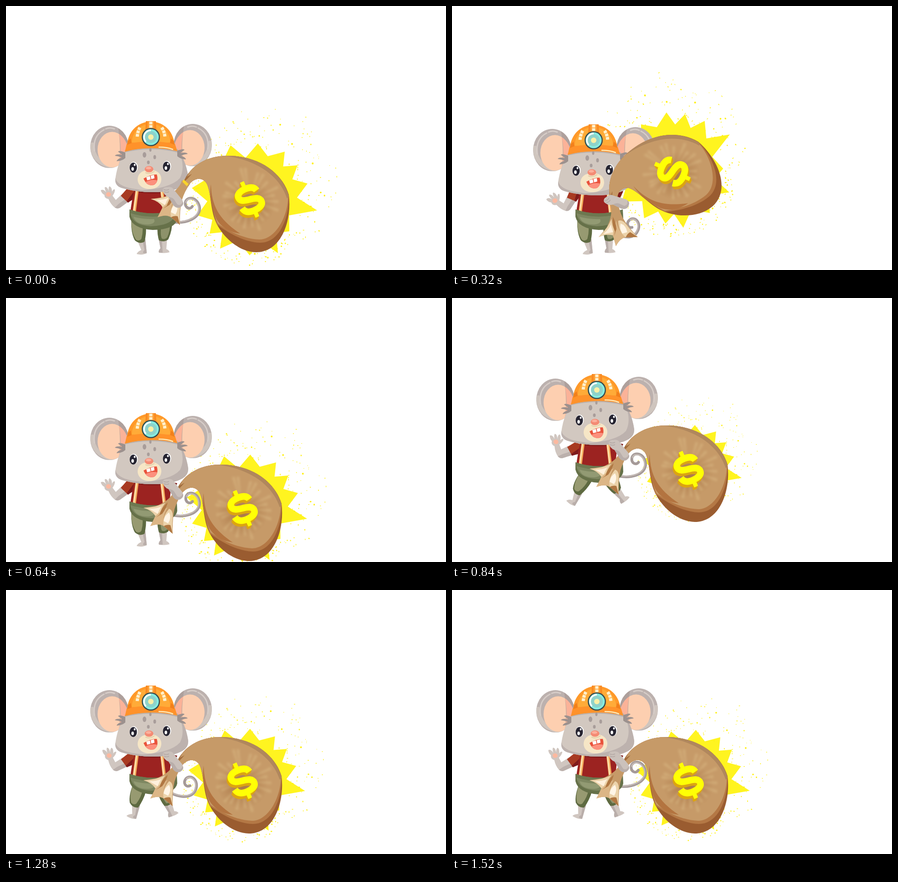
An HTML page that plays this animation: 966x580 px, repeating every 1.56 s.

```html
<!DOCTYPE html>
<html lang="en">
<head>
<meta charset="utf-8">
<title>Mouse miner with a money bag</title>
<style>
  html, body { margin: 0; width: 100%; height: 100%; overflow: hidden; background: #fff; }
  svg { display: block; width: 966px; height: 580px; }
</style>
</head>
<body>
<svg viewBox="0 0 966 580" xmlns="http://www.w3.org/2000/svg">
  <defs>
    <clipPath id="earClip"><ellipse cx="227" cy="309.500" rx="42" ry="46.500"/></clipPath>
    <clipPath id="headClip"><use href="#skull"/></clipPath>
    <radialGradient id="shade">
      <stop offset="0" stop-color="#a06a3a" stop-opacity=".75"/>
      <stop offset="1" stop-color="#a06a3a" stop-opacity="0"/>
    </radialGradient>
    <filter id="soft" x="-20%" y="-20%" width="140%" height="140%"><feGaussianBlur stdDeviation="2.500"/></filter>
    <path id="skull" d="M263 317C250 335 243 358 240 380Q239 394 252 399C280 408 310 409 330 409C356 408 375 404 388 396Q401 388 400 374C396 348 388 330 376 314Q320 300 263 317Z"/>
    <g id="ear">
      <ellipse cx="227" cy="309.500" rx="42" ry="46.500" fill="#bcb1ae"/>
      <g clip-path="url(#earClip)">
        <path d="M185 300Q182 350 238 358L238 350Q196 345 192 300Z" fill="#cfc5be"/>
        <path d="M194 318Q190 285 215 272M219 270Q228 266 238 270" fill="none" stroke="#d6ccc7" stroke-width="3" stroke-linecap="round"/>
        <ellipse cx="233" cy="315.500" rx="32" ry="39" fill="#fdcfb0"/>
        <path d="M245 260Q254 310 247 358H275V260Z" fill="#a2908c" opacity=".5"/>
        <path d="M248 281Q256 315 247 351Q268 345 268 310Q262 290 248 281Z" fill="#fbb298"/>
      </g>
    </g>
    <path id="tuft" d="M262 322Q248 316 246 320Q252 324 255 327Q242 324 239 329Q248 330 254 333Q244 336 243 341Q254 341 262 334Z" fill="#9c918e"/>
    <g id="eye">
      <ellipse cx="1" cy="-1" rx="9" ry="11.500" fill="#fff"/>
      <ellipse rx="8" ry="11" fill="#262431"/>
      <ellipse cx="3" cy="-6" rx="2" ry="2.500" fill="#fff"/>
      <ellipse cx="-1.500" cy="3" rx="2.800" ry="4" fill="#fff"/>
    </g>
    <g id="coin">
      <path d="M22-12C20-22 11-25 0-25C-13-25-21-21-21-13C-21-4-11-2 0 0C13 2 22 5 22 14C22 22 13 26 0 26C-13 26-21 22-23 11" fill="none" stroke-width="14.500"/>
      <path d="M0-42V-25M0 25V42" stroke-width="9"/>
    </g>
  </defs>

  <g id="mouseBack">
    <g class="bag"><g id="burst"></g></g>
    <g id="tail" fill="none" stroke-linecap="round">
      <path d="M350 474C385 492 423 484 424 459C424 436 402 430 396 443C392 454 402 462 409 455" stroke="#a59a98" stroke-width="6"/>
      <path d="M350 473C385 490 421 482 422 459C422 438 402 432 397 443" stroke="#c2b8b4" stroke-width="3"/>
    </g>

    <g id="legL">
      <path d="M287 512L297 536Q288 540 287 545Q300 548 309 543L306 512Z" fill="#d0c6c0"/>
      <path d="M299 512L304 536Q296 545 309 543L306 512Z" fill="#b9aeaa"/>
      <path d="M275 470Q274 500 283 515Q293 524 304 518Q309 500 307 478Z" fill="#5e6a41"/>
      <path d="M275 470Q275 500 286 514Q293 517 297 512Q302 495 299 480Z" fill="#979a71"/>
    </g>
    <g id="legR">
      <path d="M335 510L339 532Q334 538 336 542Q350 544 359 541Q358 536 352 534L354 508Z" fill="#d0c6c0"/>
      <path d="M335 510L339 532Q334 538 336 542L344 542L342 510Z" fill="#b9aeaa"/>
      <path d="M333 480Q331 502 336 515Q347 520 356 513Q365 495 365 472Z" fill="#5e6a41"/>
      <path d="M341 482Q338 502 342 511Q349 514 354 508Q361 492 360 475Z" fill="#8d926a"/>
    </g>

    <g id="armL">
      <path d="M256 412L241 426L234 417Q240 408 239 403Q235 402 233 408Q232 397 227 396Q224 400 226 407Q222 396 217 398Q216 402 220 409Q213 401 208 405Q210 412 216 415Q216 423 225 424Q230 436 239 443Q246 447 252 442L274 426Z" fill="#d0c6c0"/>
      <path d="M239 443Q246 447 252 442L274 426L268 420L247 435Z" fill="#bbb0ac"/>
      <ellipse cx="225" cy="414" rx="5.500" ry="5" fill="#fbb9a0"/>
      <path d="M265 402L252 417L268 432L284 414V402Z" fill="#a83a22"/>
      <path d="M282 406L265 429L268 432L286 420Z" fill="#7f1b1b"/>
    </g>

    <path d="M355 402L376 407L369 422L350 424Z" fill="#7f1b1b"/>
    <path d="M283 398H352L362 420L358 460H272Q276 425 283 398Z" fill="#9c2321"/>
    <path d="M283 402H352L353 410Q315 414 282 408Z" fill="#7f1b1b"/>
    <path d="M288 404L281 456M342 404L348 456" stroke="#f5ad5c" stroke-width="7"/>
    <path d="M287 404L280 456M341 404L347 456" stroke="#fde0ae" stroke-width="3"/>
    <path d="M271 447Q322 464 375 447L376 468Q372 491 322 492Q277 489 271 463Z" fill="#667149"/>
    <path d="M273 455Q322 470 371 455Q371 481 318 484Q278 482 273 455Z" fill="#7e8761"/>
    <path d="M280 463Q300 469 325 468Q330 478 312 480Q284 480 280 463Z" fill="#929a73"/>
    <path d="M271 447Q322 464 375 447V454Q322 471 271 454Z" fill="#6d7850"/>
  </g>

  <g id="head">
    <use href="#ear"/>
    <use href="#ear" transform="matrix(-1 0 0 1 637 -4)"/>
    <use href="#skull" fill="#d2c8c0"/>
    <g clip-path="url(#headClip)">
      <path d="M376 312Q396 350 382 378Q360 402 290 405V412H405V312Z" fill="#bdb2ae"/>
      <path d="M240 378Q245 398 290 403L330 411H240Z" fill="#bdb2ae"/>
      <path d="M255 323Q318 306 382 323V300H255Z" fill="#bab0ab"/>
    </g>
    <use href="#tuft"/>
    <use href="#tuft" transform="matrix(-1 0 0 1 638 -4)"/>
    <g fill="#a89d9a">
      <ellipse cx="304" cy="327" rx="4" ry="6"/><ellipse cx="317" cy="316" rx="2.500" ry="4"/>
      <ellipse cx="326.500" cy="332" rx="3" ry="4.500"/><ellipse cx="312.500" cy="343.500" rx="3" ry="4"/>
    </g>
    <use href="#eye" x="279.500" y="355"/>
    <use href="#eye" x="352.500" y="353"/>
    <path d="M289 382C289 366 302 360 316 360C332 360 341 369 341 381C340 395 330 402 315 402C300 402 290 394 289 382Z" fill="#f6e6c6"/>
    <path d="M306 366Q316 371 326 363" fill="none" stroke="#e3cfa8" stroke-width="2"/>
    <ellipse cx="314" cy="358.500" rx="9.500" ry="7" fill="#f48b74"/>
    <ellipse cx="313" cy="356" rx="6" ry="3" fill="#fcb09c"/>
    <path d="M302 379Q318 370 331 370Q336 386 325 393Q309 397 302 379Z" fill="#e9533c"/>
    <path d="M306 387Q318 380 332 383Q330 391 323 393.500Q312 395 306 387Z" fill="#fc907d"/>
    <path d="M308 376L316 373.500L317.500 381L310 383Z M317.500 373L325 371L326 378.500L319 380.500Z" fill="#fff"/>

    <path d="M266 308C266 278 288 254 318 254C348 254 370 278 370 308L376 318Q318 306 261 319Z" fill="#ff9929"/>
    <path d="M276 300C277 278 293 260 318 259C343 260 360 278 361 300Z" fill="#ffab38"/>
    <path d="M265 303Q318 292 371 303L376 319Q318 304 261 320Z" fill="#ff922a"/>
    <path d="M268 296L274 291L276 301L266 305ZM368 296L362 291L360 301L370 305Z" fill="#f2801c"/>
    <path d="M305 292L307 253H329L331 292Z" fill="#f98a22"/>
    <path d="M310 290L311 254H325L326 290Z" fill="#ffa035"/>
    <path d="M336 310Q354 310 366 315" fill="none" stroke="#ffe9b8" stroke-width="2.500" stroke-linecap="round"/>
    <g fill="none" stroke="#fff0cc" stroke-width="7" stroke-dasharray="6 1.500">
      <path d="M318 254V269"/><path d="M294 267Q289 276 288 288"/><path d="M342 267Q348 276 349 288"/>
    </g>
    <circle cx="318" cy="288" r="20" fill="#374a4d"/>
    <circle cx="318" cy="288" r="17.500" fill="#85ece0"/>
    <path d="M306 300A17 17 0 0 1 318 271L318 276A12 12 0 0 0 309 296Z" fill="#f0fffc"/>
    <circle cx="318" cy="288" r="13" fill="#8ed2ca"/>
    <circle cx="318" cy="288" r="6" fill="#faf0a6"/>
  </g>

  <g id="front">
    <g class="bag">
      <path d="M370 420C366 437 350 449 330 457L302 461Q320 466 328 479L317 501Q336 494 346 501L366 518Q365 485 370 464Q376 444 388 428Z" fill="#c69a68"/>
      <path d="M302 461Q330 460 350 450Q340 462 337 478L328 479Q320 466 302 461Z" fill="#ecd3ab"/>
      <path d="M328 479Q342 466 355 460Q343 478 346 501Q336 494 317 501Z" fill="#dcb686"/>
      <path d="M337 476Q341 461 355 449Q352 462 343 474L329 482Z" fill="#b07742"/>
      <path d="M346 501Q342 482 358 463Q367 466 366 482Q364 500 366 518Z" fill="#ecd3ab"/>
      <path d="M346 490Q348 477 358 471Q364 482 356 495Z" fill="#fff5e6"/>
      <path d="M346 501Q354 497 361 499L366 518Z" fill="#b07742"/>
      <path d="M314 463Q332 463 341 458Q336 466 333 474Z" fill="#fff0dc"/>

      <path d="M374 424C388 388 425 366 470 366C545 366 592 408 605 452C612 510 588 578 533 578C492 577 455 540 442 505C432 475 434 444 424 426C414 412 396 414 384 432Z" fill="#9a5c30"/>
      <path d="M374 424C388 388 425 366 470 366C545 366 592 408 605 454C606 500 586 557 542 557C506 556 470 534 447 517C434 482 434 444 424 426C414 412 396 414 384 432Z" fill="#b47845"/>
      <path d="M374 424C388 388 425 366 470 366C545 366 592 408 603 456C604 494 578 550 540 550C506 549 474 532 449 515C434 480 434 444 424 426C414 412 396 414 384 432Z" fill="#c69a68"/>
      <path d="M462 366C545 364 592 408 605 454L601 460C586 412 536 374 462 366Z" fill="#b0875d"/>
      <path d="M434 429C435 476 452 506 498 537C473 534 456 522 446 505C434 478 430 450 434 429Z" fill="#b37440"/>
      <path d="M374 424Q380 408 387 403L381 412L392 406L383 416Z" fill="#a26c3c"/>
      <path d="M374 418L385 428L381 433L371 423Z" fill="#f9d32b"/>
      <ellipse cx="519" cy="474" rx="55" ry="50" fill="url(#shade)"/>
      <g id="rays" filter="url(#soft)"></g>
      <g transform="translate(517 468) rotate(-24)" stroke="#dca510"><use href="#coin"/></g>
      <g transform="translate(518 465) rotate(-24)" stroke="#dca510"><use href="#coin"/></g>
      <g transform="translate(519 462) rotate(-24)" stroke="#ffff05"><use href="#coin"/></g>
    </g>
    <g id="armR">
      <path d="M344 404Q346 397 354 398Q364 396 369 404L387 426Q392 436 383 442Q374 446 367 437L357 420Q346 416 344 404Z" fill="#cbc1bb"/>
      <path d="M357 420Q365 420 369 425L376 436Q384 440 388 430Q392 436 383 442Q374 446 367 437Z" fill="#b9aeaa"/>
      <path d="M347 408Q353 411 358 408M346 403Q352 406 358 403" fill="none" stroke="#b3a8a4" stroke-width="1.500"/>
    </g>
  </g>
</svg>
<script>
const LOOP = 1560, STEP = 40, CX = 519, CY = 463;
const $ = id => document.getElementById(id);
const bags = document.querySelectorAll('.bag');

let seed = 11;
const rnd = () => (seed = (seed * 16807) % 2147483647) / 2147483647;

function add(parent, tag, attrs) {
  const el = document.createElementNS('http://www.w3.org/2000/svg', tag);
  for (const k in attrs) el.setAttribute(k, attrs[k]);
  parent.append(el);
}

// Star tips around the centre of the bag
const tips = [[148, 23], [127, -36], [105, -76], [77, -106], [18, -124], [-42, -120],
  [-127, -26], [-115, 34], [-88, 74], [-65, 107], [0, 122], [62, 117], [87, 69]];

function drawBurst() {
  let d = '';
  tips.forEach(([x, y], i) => {
    const [u, v] = tips[(i + 1) % tips.length];
    const mx = x + u, my = y + v, k = (mx > 0 && my < 40 ? 104 : 93) / Math.hypot(mx, my);
    d += `${i ? 'L' : 'M'}${x} ${y}L${mx * k} ${my * k}`;
  });
  add($('burst'), 'path', { d: d + 'Z', fill: '#fff420' });
  for (let i = 0; i < 250; i++) {
    const a = rnd() * 2 * Math.PI, reach = 30 + 80 * Math.max(0, Math.cos(a + .8));
    const r = 114 + reach * rnd() ** 1.2;
    add($('burst'), 'ellipse', {
      cx: r * Math.cos(a), cy: r * Math.sin(a),
      rx: .7 + 1.4 * rnd() ** 2, ry: .7 + 1.4 * rnd() ** 2, fill: '#fff012'
    });
  }
}

function drawRays() {
  for (let i = 0; i < 22; i++) {
    const a = (i + rnd() * .6) / 22 * 2 * Math.PI, r = 50 + 24 * rnd();
    const c = Math.cos(a), s = Math.sin(a);
    add($('rays'), 'path', {
      d: `M${CX + 14 * c} ${CY + 14 * s}L${CX + r * c - 3 * s} ${CY + r * s + 3 * c}L${CX + r * c + 3 * s} ${CY + r * s - 3 * c}Z`,
      fill: '#e2c690', opacity: .4
    });
  }
}

// Star size over time
const pulse = [[0, 1], [320, 1], [640, .96], [840, .79], [1040, .78], [1280, .93], [1520, .91], [1560, 1]];
function ease(keys, t) {
  const i = keys.findIndex(k => k[0] > t);
  const [t0, a] = keys[i - 1], [t1, b] = keys[i];
  return a + (b - a) * (1 - Math.cos(Math.PI * (t - t0) / (t1 - t0))) / 2;
}

// Jumps: start and length in ms
const jumps = [[752, 352], [1220, 360]];
function height(t) {
  const j = jumps.find(([s, len]) => t >= s && t < s + len);
  return j ? 172 * Math.sin(Math.PI * (t - j[0]) / j[1]) ** 2 : 0;
}

const move = (el, x, y) => el.setAttribute('transform', `translate(${x} ${y})`);
const turn = (el, a, x, y) => el.setAttribute('transform', `rotate(${a} ${x} ${y})`);

function pose(t) {
  const h = height(t);
  const swing = t < 640 ? Math.sin(Math.PI * t / 640) ** 2 : 0;
  const lift = t < 320 ? (1 + Math.cos(Math.PI * t / 320)) / 2 : 0;
  const kick = 40 * Math.sin(h / 76);
  move($('mouseBack'), 0, -h);
  move($('front'), 0, -h);
  move($('head'), -7 * swing, 7 * swing - h);
  for (const b of bags)
    b.setAttribute('transform', `translate(${16 * lift} ${-37 * lift}) rotate(${-42 * swing} 373 458.500)`);
  $('burst').setAttribute('transform', `translate(${CX} ${CY}) scale(${ease(pulse, t)})`);
  turn($('tail'), 9 + 24 * Math.cos(2 * Math.PI * (t - 350) / 780), 348, 447);
  turn($('legL'), kick, 290, 483);
  turn($('legR'), -kick, 348, 485);
  turn($('armL'), kick / 2 - 20 * swing, 264, 418);
  turn($('armR'), -34 * swing, 382, 434);
}

drawBurst();
drawRays();
const start = performance.now();
function tick() {
  const t = (performance.now() - start) % LOOP;
  pose(Math.floor(t / STEP) * STEP);
  requestAnimationFrame(tick);
}
pose(0);
requestAnimationFrame(tick);
</script>
</body>
</html>
```
